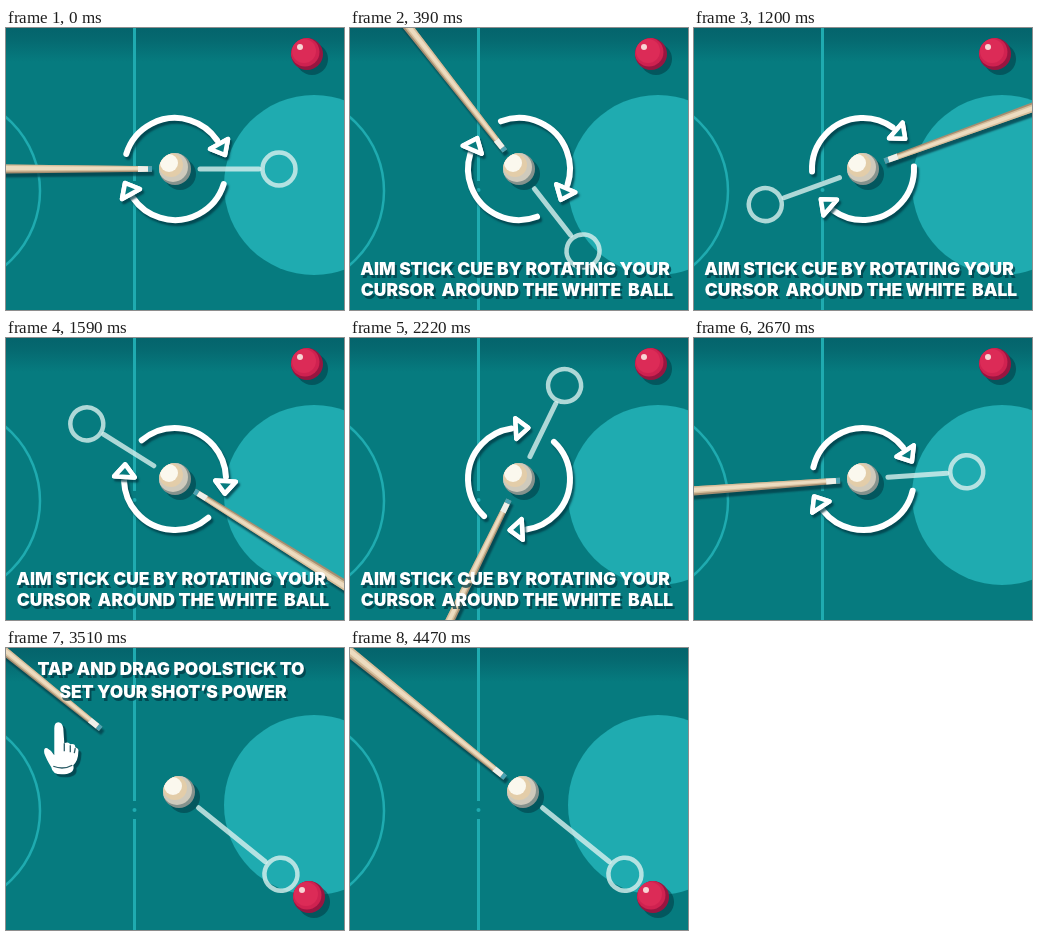
Recreate the animation shown at these times as an HTML page with a canvas. Size 338 px wide and 282 px high, loop 4.5 s.

```html
<!DOCTYPE html>
<html lang="en">
<head>
<meta charset="utf-8">
<title>Pool tutorial</title>
<style>
html, body { margin: 0; width: 100%; height: 100%; overflow: hidden; background: #067b7f; }
canvas { display: block; }
</style>
</head>
<body>
<canvas id="stage" width="338" height="282"></canvas>
<script>
const ctx = document.getElementById('stage').getContext('2d');
const LOOP = 4500, STEP = 30, CUT = 2715, TAU = Math.PI * 2;
const SHOT_ANGLE = 38.9 * Math.PI / 180;
const CLOTH = '#067b7f', LINE = '#1fabb0', SHADE = 'rgba(2,58,68,.75)';
// Ball layers: offset towards the light, radius, colour.
const WHITE_BALL = [[0, 17, '#85928d'], [-2, 15, '#cfcabc'], [-4, 12, '#e3cda9'], [-6, 9, '#fbf8ee']];
const RED_BALL = [[0, 17, '#981540'], [-2, 14.5, '#cf2250'], [-3, 12, '#dc2b57'], [-7, 3, '#f8d5d5']];
const HAND = new Path2D('M48 80q0-6 4-6q4 0 5 6l1 15q4-2 6 1q5-1 5 3q4 1 3 5q0 8-5 13q2 8-9 9q-12 1-13-7q-5-8-7-14q-1-6 3-5q4 2 7 7z');
const HAND_LINES = new Path2D('M58 95v8M64 97v7M69 100l-1 5M47 118q10 4 19-1');

const ramp = (t, from, to) => Math.min(1, Math.max(0, (t - from) / (to - from)));
const ease = (t, from, to) => { const p = ramp(t, from, to); return p * p * (3 - 2 * p); };

function disc(x, y, r, color) {
  ctx.fillStyle = color;
  ctx.beginPath();
  ctx.arc(x, y, r, 0, TAU);
  ctx.fill();
}

function ring(x, y, r, color, width) {
  ctx.strokeStyle = color;
  ctx.lineWidth = width;
  ctx.beginPath();
  ctx.arc(x, y, r, 0, TAU);
  ctx.stroke();
}

function layer(draw) {
  ctx.save();
  draw();
  ctx.restore();
}

function castShadow(x, y, blur = 1) {
  ctx.shadowColor = SHADE;
  ctx.shadowOffsetX = x;
  ctx.shadowOffsetY = y;
  ctx.shadowBlur = blur;
}

function table() {
  const cloth = ctx.createLinearGradient(0, 0, 0, 34);
  cloth.addColorStop(0, '#04646c');
  cloth.addColorStop(.3, '#05686f');
  cloth.addColorStop(1, CLOTH);
  ctx.fillStyle = cloth;
  ctx.fillRect(0, 0, 338, 282);
  ring(-63, 163, 97, LINE, 2.5);
  ctx.fillStyle = LINE;
  ctx.fillRect(127, 0, 3, 153);
  ctx.fillRect(127, 171, 3, 111);
  disc(128.5, 162, 2, LINE);
  disc(308, 157, 90, LINE);
}

function ball(x, y, layers) {
  disc(x + 5, y + 5, 16, 'rgba(2,58,68,.55)');
  layer(() => {
    ctx.beginPath();
    ctx.arc(x, y, 16, 0, TAU);
    ctx.clip();
    for (const [offset, r, color] of layers) disc(x + offset, y + offset, r, color);
  });
}

function arrows() {
  for (const turn of [0, Math.PI]) layer(() => {
    ctx.rotate(turn);
    castShadow(2, 3, 2);
    ctx.strokeStyle = '#fff';
    ctx.lineCap = ctx.lineJoin = 'round';
    ctx.lineWidth = 6;
    ctx.beginPath();
    ctx.arc(0, 0, 51, -2.84, -.6);
    ctx.stroke();
    ctx.lineWidth = 4.5;
    ctx.beginPath();
    ctx.moveTo(35, -20);
    ctx.lineTo(53, -30);
    ctx.lineTo(50, -14);
    ctx.closePath();
    ctx.stroke();
    ctx.shadowColor = 'transparent';
    ctx.fillStyle = CLOTH;
    ctx.fill();
    ctx.stroke();
  });
}

// Guide and cue lie along the local x axis, with the white ball at 0.
function guide(distance) {
  ctx.strokeStyle = 'rgba(222,242,240,.78)';
  ctx.lineWidth = 5;
  ctx.lineCap = 'round';
  ctx.beginPath();
  ctx.moveTo(25, 0);
  ctx.lineTo(distance - 20, 0);
  ctx.stroke();
  ring(distance, 0, 16.5, ctx.strokeStyle, 4.5);
}

function taper(from, to, top, bottom, color) {
  const half = x => 2.8 + (-x - 23) * .012;
  ctx.fillStyle = color;
  ctx.beginPath();
  ctx.moveTo(from, half(from) * top);
  ctx.lineTo(to, half(to) * top);
  ctx.lineTo(to, half(to) * bottom);
  ctx.lineTo(from, half(from) * bottom);
  ctx.fill();
}

function cue(pull) {
  ctx.translate(-pull, 0);
  layer(() => {
    castShadow(2, 4, 2);
    taper(-360, -23, -1, 1, '#a58d70');
  });
  taper(-360, -37, -1, .6, '#d6bf9c');
  taper(-360, -37, -.65, .25, '#eddcc0');
  taper(-37, -27, -1, 1, '#eef0ea');
  taper(-27, -23, -1, 1, '#4aa3b4');
}

function hand(pull) {
  const shift = 78 - pull;
  ctx.translate(shift * Math.cos(SHOT_ANGLE), shift * Math.sin(SHOT_ANGLE));
  layer(() => {
    castShadow(3, 3);
    ctx.fillStyle = '#fff';
    ctx.fill(HAND);
  });
  ctx.strokeStyle = '#2c5c66';
  ctx.lineWidth = 1.3;
  ctx.stroke(HAND_LINES);
}

function caption(lines, alpha) {
  layer(() => {
    ctx.globalAlpha = alpha;
    ctx.font = '900 17.4px Inter, Roboto, sans-serif';
    ctx.textAlign = 'center';
    ctx.fillStyle = '#fff';
    castShadow(2, 3, 0);
    for (const [text, x, y] of lines) ctx.fillText(text, x, y);
  });
}

function aimScene(t) {
  ball(301, 26, RED_BALL);
  layer(() => {
    ctx.translate(169, 141);
    ctx.rotate(t / 2700 * TAU);
    guide(104);
    arrows();
    cue(0);
  });
  ball(169, 141, WHITE_BALL);
  caption([
    ['AIM STICK CUE BY ROTATING YOUR', 165, 247],
    ['CURSOR  AROUND THE WHITE  BALL', 167, 268]
  ], ramp(t, 30, 210) * (1 - ramp(t, 2550, 2660)));
}

function shotScene(t) {
  const release = 1 - ramp(t, 4360, 4440);
  const pull = (92 * ease(t, 2790, 3750) - 30 * ease(t, 3820, 4360)) * release;
  const visible = ramp(t, 2715, 2850) * release;
  ball(303, 249, RED_BALL);
  layer(() => {
    ctx.translate(173, 144);
    ctx.rotate(SHOT_ANGLE);
    guide(131);
    cue(pull);
  });
  ball(173, 144, WHITE_BALL);
  layer(() => {
    ctx.globalAlpha = visible;
    hand(pull);
  });
  caption([
    ['TAP AND DRAG POOLSTICK TO', 165, 27],
    ['SET YOUR SHOT’S POWER', 167, 50]
  ], visible);
}

function frame() {
  const t = Math.floor(performance.now() % LOOP / STEP) * STEP;
  table();
  (t < CUT ? aimScene : shotScene)(t);
  requestAnimationFrame(frame);
}
frame();
</script>
</body>
</html>
```
